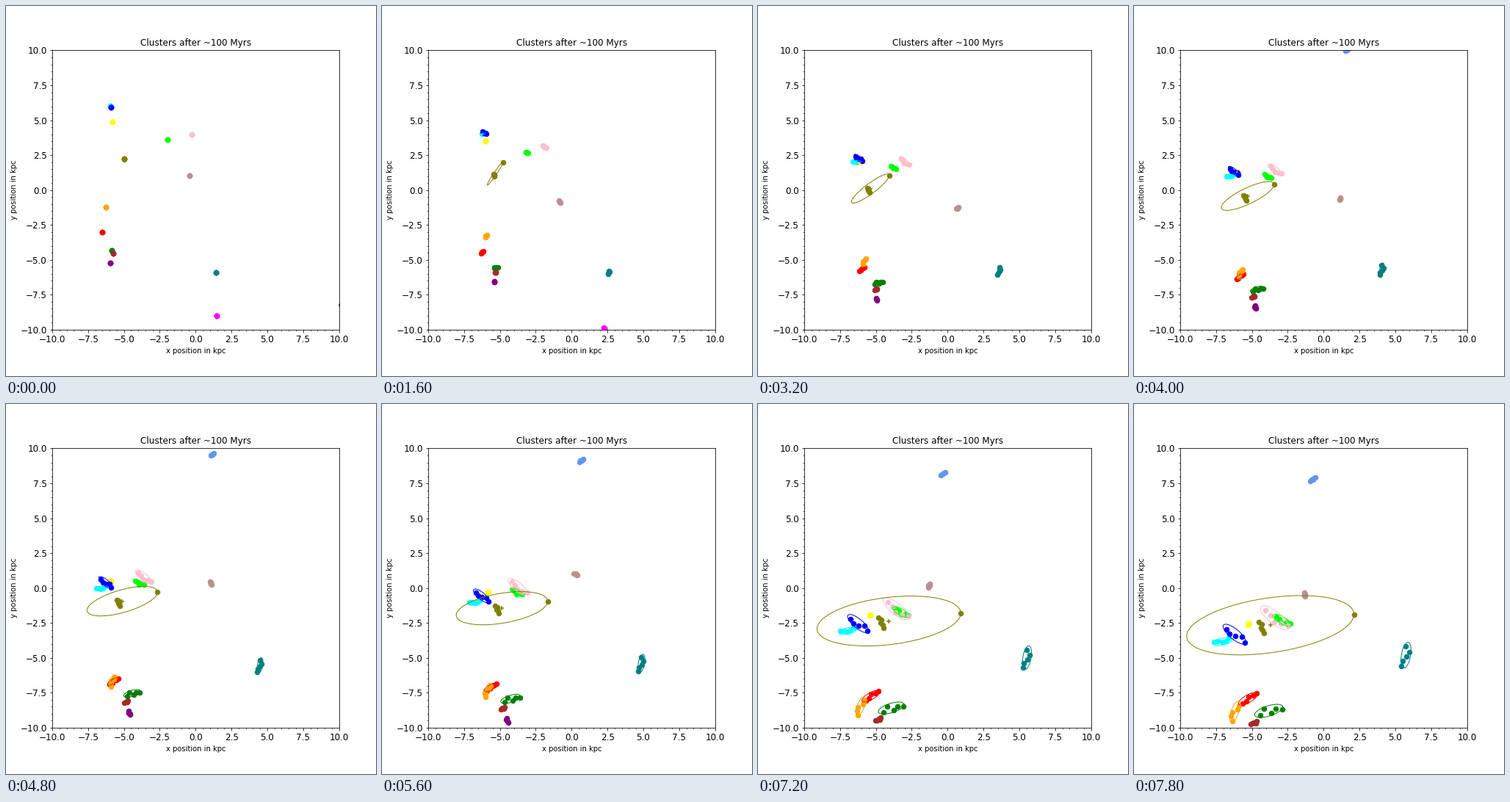
Animation, 504 px wide and 504 px high, one loop 8 s. Source, as a matplotlib script:

```python
import numpy as np
import matplotlib.pyplot as plt
from matplotlib.animation import FuncAnimation
from matplotlib.ticker import AutoMinorLocator, MultipleLocator

SIZE, DPI = 504, 72
FRAMES, STEP = 40, 200
KEYS = (0, 4.8, 7.8)                    # seconds of the three path points
CENTRE = np.array([258.3, 250.7])       # galactic centre, in stage pixels
t = np.arange(FRAMES) * STEP / 1000
age = t / t[-1]
grow = age[:, None] ** 1.1
phase = np.linspace(0, 2 * np.pi, 150)
rng = np.random.default_rng(4)

plt.rcParams.update({"font.family": "DejaVu Sans", "text.kerning_factor": 6})
fig = plt.figure(figsize=(SIZE / DPI, SIZE / DPI), dpi=DPI, facecolor="white")
ax = fig.add_subplot()
fig.subplots_adjust(left=0.125, right=0.9, bottom=0.125, top=0.88)
ax.set(xlim=(-10, 10), ylim=(-10, 10))
ax.set_title("Clusters after ~100 Myrs", fontsize=12)
ax.set_xlabel("x position in kpc", fontsize=10)
ax.set_ylabel("y position in kpc", fontsize=10)
ax.tick_params(labelsize=12)
for axis in (ax.xaxis, ax.yaxis):
    axis.set_major_locator(MultipleLocator(2.5))
    axis.set_minor_locator(AutoMinorLocator(5))


def kpc(points):
    """Stage pixels to axis units."""
    return (points[:, 0] - 63) / 19.53 - 10, (441 - points[:, 1]) / 19.026 - 10


def arc(*points):
    """Parabolic path through the start, a later point and the end."""
    return np.vander(t, 3) @ np.polyfit(KEYS, np.array(points), 2)


def epicycle():
    """Tight orbit round the centre with a radial wobble."""
    w = 2 * np.pi * (t - 0.6) / 5
    r = 24 - 4 * np.cos(w)
    a = np.radians(237 - 55.2 * t - 13 * np.sin(w))
    return CENTRE + np.stack([r * np.cos(a), r * np.sin(a)], axis=1)


def spread(path, long, wide, p, q):
    """Points p along and q across a moving pair of half axes."""
    return (path[:, None] + p[None, :, None] * long[:, None]
            + q[None, :, None] * wide[:, None])


def oval(path, long, wide):
    return spread(path, long, wide, np.cos(phase), np.sin(phase))


def across(long):
    return 0.35 * long[:, ::-1] * (-1, 1)


def scatter(path, long, n=5):
    return spread(path, long, across(long),
                  np.linspace(-0.65, 0.9, n), rng.uniform(-0.7, 0.7, n))


tracks = []                             # (artist, positions for every frame)


def add(points, style, **kw):
    line, = ax.plot([], [], style, ms=6, **kw)
    tracks.append((line, points))


def cluster(color, path, long):
    add(scatter(path, long), "o", color=color, mew=1.5)
    add(oval(path, long, across(long)), "-", color=color, lw=1, zorder=2.1)


# Colour, three path points, half axis of the cluster at the end.
for color, a, b, c, axis in (
    ("black", (456.8, 406.5), (520, 360), (545, 330), (0, 0)),
    ("magenta", (287, 422), (325, 468), (335, 490), (4, 6)),
    ("cyan", (141.5, 135.5), (130, 251), (121.3, 323.5), (-13, 3.5)),
    ("yellow", (145.5, 158), (142, 241), (156, 300), (1, -1)),
    ("blue", (143, 138.5), (135.5, 243), (137, 313.5), (15, 12.5)),
    ("lime", (219.5, 181.5), (181, 243.5), (201.5, 294.5), (12, 7)),
    ("pink", (252.5, 175), (187.5, 235.5), (191.5, 291), (18.5, 15)),
    ("cornflowerblue", (325, 24), (280.5, 68.5), (243, 102.5), (4.5, -2)),
    ("red", (131, 307.5), (146, 378), (155.5, 401.5), (13, -7.5)),
    ("orange", (135.5, 274), (145, 377), (137.5, 419), (-5, 14)),
    ("green", (144.5, 332.5), (171.5, 394.2), (183.5, 418), (19, -6)),
    ("brown", (146, 336.5), (163.5, 406), (162.5, 435), (5, -3)),
    ("purple", (142, 350), (168, 420.5), (174, 455), (1.5, 5.5)),
    ("teal", (286, 363), (346, 356), (370.5, 342), (-3, 17.5)),
):
    cluster(color, arc(a, b, c), grow * axis)

inner = epicycle()
cluster("rosybrown", inner, 0.8 * np.sqrt(grow) * np.gradient(inner, axis=0))

# One olive star escapes and stretches its cluster's oval.
core = arc((161, 208.5), (153, 270), (173, 303))
runaway = np.stack([161 + 138.5 * age ** 2.3,
                    208.5 + 39 * (1 - np.cos(np.pi * age ** 1.15))], axis=1)
mean = core + (runaway - core) / 10
reach = runaway - mean
add(scatter(core, grow * (5, 9)), "o", color="olive", mew=1.5)
add(runaway[:, None], "o", color="olive", mew=1.5)
add(mean[:, None], "+", color="olive", mew=1.5)
add(oval(mean, reach, reach[:, :1] * (0, 0.33)), "-",
    color="olive", lw=1, zorder=2.1)


def draw(i):
    for line, points in tracks:
        line.set_data(*kpc(points[i]))
    return [line for line, _ in tracks]


anim = FuncAnimation(fig, draw, frames=FRAMES, interval=STEP,
                     init_func=lambda: draw(0), repeat=True, repeat_delay=0)
plt.show()
```
